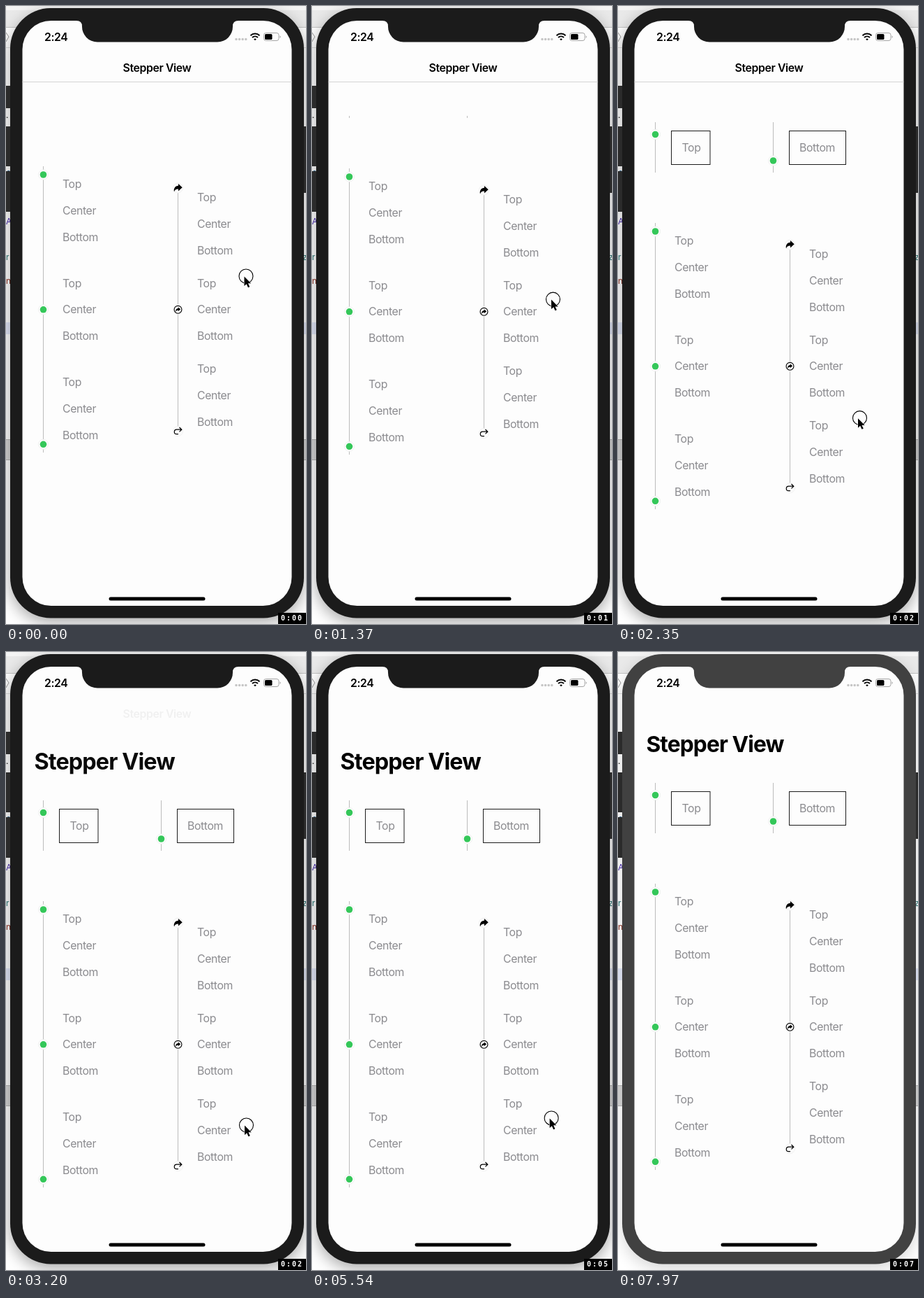
Write an HTML page that moves like this. It is 430 px wide and 883 px high and loops after 8070 ms.

```html
<!DOCTYPE html>
<html lang="en">
<head>
<meta charset="utf-8">
<title>Stepper View</title>
<style>
  html, body { margin: 0; width: 100%; height: 100%; overflow: hidden; background: #fff; }
  svg { display: block; width: 430px; height: 883px; }
  text { font-family: Inter, Roboto, sans-serif; }
  .label { font-size: 15.85px; letter-spacing: -.4px; fill: #8b8b8f; }
  .bar { font-size: 15.85px; letter-spacing: -.4px; font-weight: 600; }
  #large { font-weight: 700; letter-spacing: -.028em; }
  .code { font: 12px "DejaVu Sans Mono", monospace; }
  #clock { font: bold 10px "DejaVu Sans Mono", monospace; letter-spacing: 2px; fill: #fff; }
</style>
</head>
<body>
<svg viewBox="0 0 430 883">
  <defs>
    <clipPath id="list"><rect x="23" y="157" width="387" height="700"/></clipPath>
    <filter id="blur" x="-20%" y="-20%" width="140%" height="140%"><feGaussianBlur stdDeviation="11"/></filter>
    <path id="share" d="M.5-6 6.2-.8 .5 4.4V1.6C-2.8 1.5-4.6 2.8-5.5 5.6-6.6 .8-4-3.1 .5-3.2Z"/>
  </defs>

  <!-- window behind the phone -->
  <rect width="430" height="883" fill="#fff"/>
  <rect width="430" height="30" fill="#e9e9e9"/>
  <rect width="430" height="6" fill="#f4f4f4"/>
  <rect y="30" width="430" height="1" fill="#c4c4c4"/>
  <path d="M0 38 4 44 0 51" fill="none" stroke="#999"/>
  <rect y="59" width="430" height="1" fill="#ddd"/>
  <rect y="452" width="430" height="17" fill="#e4e9fa"/>
  <rect y="619" width="430" height="30" fill="#d6d6d6"/>
  <path d="M0 619.5H430M0 648.5H430" stroke="#b4b4b4"/>
  <g class="code">
    <text x="0" y="160">.</text>
    <text x="0" y="242" fill="#356e9c">e</text>
    <text x="0" y="312" fill="#4b2fb0">A</text>
    <text x="0" y="363" fill="#2f7a78">r</text>
    <text x="0" y="397" fill="#8f3527">n</text>
    <text x="425" y="363" fill="#2f7a78">z</text>
  </g>
  <rect id="shadow" x="6" y="10" width="421" height="871" rx="58" filter="url(#blur)"/>

  <!-- phone -->
  <path d="M0 114H8V146H0ZM0 172H8V229H0ZM0 236H8V294H0ZM425 172H430V267H425Z" fill="#2b2b2b"/>
  <rect id="body" x="6" y="3" width="421" height="871.5" rx="58"/>
  <rect x="23.5" y="21" width="386" height="836" rx="41" fill="#fdfdfd"/>
  <path id="notch" d="M101 20V21Q109 21 109 29A22 22 0 0 0 131 51.5H303A22 22 0 0 0 325 29Q325 21 333 21V20Z"/>
  <text class="bar" x="55" y="49.5">2:24</text>
  <path d="M330 47.5h0m4.6 0h0m4.6 0h0m4.6 0h0" stroke="#c6c6c6" stroke-width="3.6" stroke-linecap="round"/>
  <g fill="none" stroke="#000" stroke-width="2">
    <path d="M350.5 42.2a9.4 9.4 0 0 1 13 0M353 45a6 6 0 0 1 8 0"/>
    <path d="M357 49.3 355.2 47.4a2.6 2.6 0 0 1 3.6 0Z" fill="#000" stroke="none"/>
  </g>
  <rect x="369.5" y="38.5" width="21.5" height="11" rx="3" fill="none" stroke="#a5a5a5"/>
  <rect x="371" y="40" width="10.5" height="8" rx="1.5"/>
  <path d="M392.5 42.2q2.6 1.8 0 3.6Z" fill="#a5a5a5"/>

  <g id="content" clip-path="url(#list)"><g id="scroll"></g></g>

  <g id="small">
    <rect x="23.5" y="108" width="386" height="1" fill="#d4d4d4"/>
    <text class="bar" x="216.5" y="94" text-anchor="middle">Stepper View</text>
  </g>
  <text id="large" x="40.5">Stepper View</text>
  <rect x="147.5" y="844.5" width="138" height="5" rx="2.5"/>

  <g id="cursor">
    <circle r="10" fill="none" stroke="#000" stroke-width="1.1"/>
    <path d="M-2.5 .5V14L.7 11.2 3 16.2 5.3 15.2 3 10.3H7.2Z" stroke="#fff" stroke-width="1" paint-order="stroke"/>
  </g>
  <rect x="390" y="867" width="40" height="16"/>
  <text id="clock" x="394" y="878"></text>
</svg>
<script>
const LOOP = 8070, $ = id => document.getElementById(id);

// Scrolling content, laid out at rest
const label = (s, x, mid) => `<text class="label" x="${x}" y="${mid + 5.6}">${s}</text>`;
const line = (x, y1, y2) => `<rect x="${x}" y="${y1}" width="1" height="${y2 - y1}" fill="#bcbcbc"/>`;
const halo = (x, y) => `<circle cx="${x}" cy="${y}" r="7" fill="#fdfdfd" stroke="#f1f1f1"/>`;
const dot = (x, y) => halo(x, y) + `<circle cx="${x}" cy="${y}" r="4.8" fill="#34c759"/>`;
const icon = (y, art) => halo(246.5, y) + `<g transform="translate(246.5 ${y})">${art}</g>`;
const group = (x, mid) => ['Top', 'Center', 'Bottom'].map((s, i) => label(s, x, mid + i * 37.75)).join('');
const box = (x, w) => `<rect x="${x}" y="199.5" width="${w}" height="48" fill="none" stroke="#1c1c1c"/>`;

$('scroll').innerHTML =
  line(53, 187, 259) + dot(53.5, 204.5) + box(76.5, 55.5) + label('Top', 91.5, 223.5) +
  line(222, 187, 259) + dot(222.5, 242) + box(245.5, 81) + label('Bottom', 260, 223.5) +
  line(53, 331, 740) + [343, 535.8, 728.3].map(y => dot(53.5, y)).join('') +
  [356.6, 498, 639.4].map(y => group(81, y)).join('') +
  line(246, 362, 710) +
  icon(362, '<use href="#share"/>') +
  icon(535.8, '<circle r="5.4" fill="none" stroke="#000" stroke-width="1.1"/><use href="#share" transform="scale(.58)"/>') +
  icon(709.6, '<path d="M.5 4H-2A3.2 3.2 0 0 1-2-2.4H5M2-5.6 5.3-2.4 2 .8" fill="none" stroke="#000" stroke-width="1.2"/>') +
  [375.4, 498, 620.8].map(y => group(274, y)).join('');

// Monotone cubic through [time, value] keys
function track(keys) {
  const rise = keys.slice(1).map(([t, v], i) => (v - keys[i][1]) / (t - keys[i][0]));
  const slope = keys.map((_, i) => {
    const a = rise[i - 1] || 0, b = rise[i] || 0;
    return a * b > 0 ? 2 * a * b / (a + b) : 0;
  });
  return t => {
    const n = keys.findIndex(k => k[0] > t);
    if (n < 0) return keys[keys.length - 1][1];
    if (n === 0) return keys[0][1];
    const [t0, v0] = keys[n - 1], [t1, v1] = keys[n], d = t1 - t0, u = (t - t0) / d, w = 1 - u;
    return v0 * (1 + 2 * u) * w * w + v1 * u * u * (3 - 2 * u) + d * u * w * (slope[n - 1] * w - slope[n] * u);
  };
}

const offset = track([[40, -102], [380, -128], [650, -128], [1370, -99], [2350, -21], [2670, 1.6],
  [2880, 1.6], [3200, 25.3], [3620, 40], [4600, 40], [4750, 39.2], [5420, 29.5], [6010, 6.3],
  [6400, 6.3], [6720, 0]]);
const cursorX = track([[0, 344], [1370, 345.5], [2350, 346.5], [3200, 344.5], [4750, 344.5], [6010, 342.5]]);
const cursorY = track([[40, 386], [380, 354], [650, 354], [1370, 419], [2350, 588.5], [2670, 636],
  [2880, 636], [3200, 676], [3620, 693.5], [4600, 693.5], [4750, 692.5], [5420, 674], [6010, 628.5],
  [7240, 628.5], [7820, 896]]);
const ticks = [1020, 2050, 3300, 4220, 5200, 6310, 7260];
const clamp = v => Math.max(0, Math.min(1, v));

function draw(t) {
  const y = offset(t), idle = t >= 7970;
  $('scroll').setAttribute('transform', `translate(0 ${Math.round(y)})`);
  $('cursor').setAttribute('transform', `translate(${cursorX(t)} ${cursorY(t)})`);

  $('small').setAttribute('opacity', t < 2910 ? 1 : clamp((3215 - t) / 305));
  $('small').firstElementChild.setAttribute('opacity', t < 2910 ? 1 : 0);
  const large = $('large');
  large.setAttribute('opacity', t < 2910 ? 0 : clamp((t - 2890) / 325));
  large.setAttribute('y', 142.5 + y);
  large.setAttribute('font-size', 31.7 * (1 + y / 1150));

  $('body').setAttribute('fill', idle ? '#414141' : '#1b1b1b');
  $('notch').setAttribute('fill', idle ? '#414141' : '#1b1b1b');
  $('shadow').setAttribute('opacity', idle ? .16 : .34);
  $('clock').textContent = '0:0' + ticks.filter(k => t >= k).length;
}

const start = performance.now();
function loop() {
  draw((performance.now() - start) % LOOP);
  requestAnimationFrame(loop);
}
loop();
</script>
</body>
</html>
```
